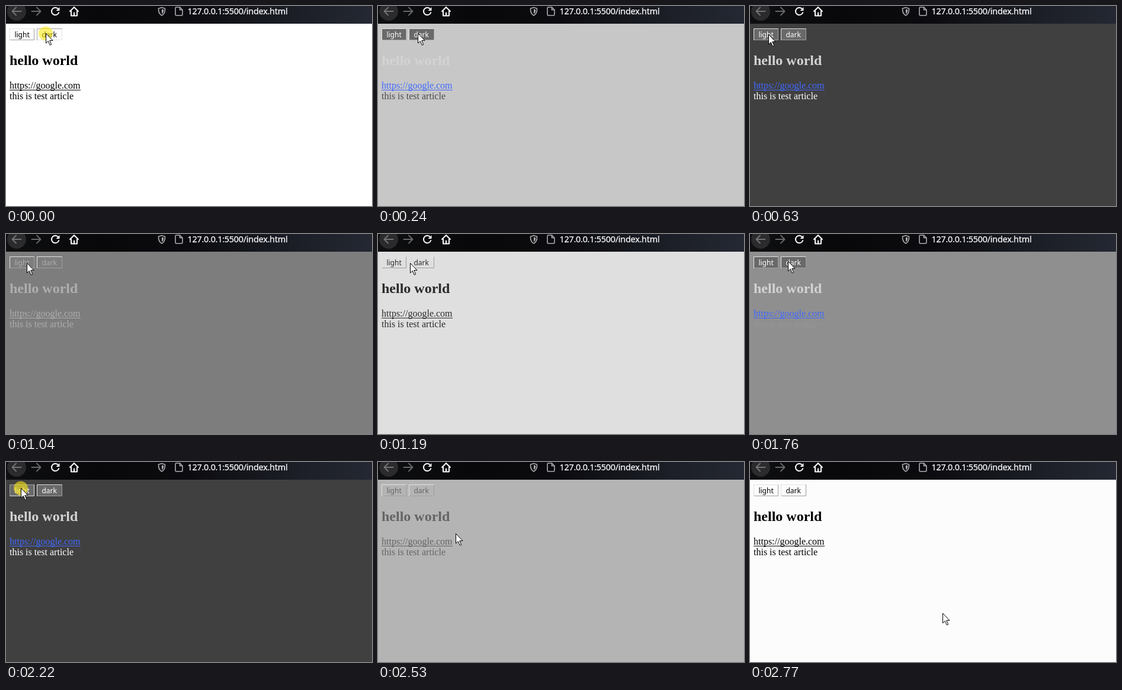
Animation of 618x339 px, one loop 2860 ms. Source, as an HTML page:

```html
<!DOCTYPE html>
<html lang="en">
<head>
<meta charset="utf-8">
<title>Theme switch</title>
<style>
  html, body { margin: 0; width: 100%; height: 100%; overflow: hidden; }
  svg { display: block; width: 618px; height: 339px; }
  .serif { font-family: "Liberation Serif", "Times New Roman", serif; font-size: 16px; }
  .title { font-size: 24px; font-weight: bold; }
  .label { font: 12px "Noto Sans", "Open Sans", sans-serif; }
  .url {
    font: 14.4px "Noto Sans", "Open Sans", sans-serif; letter-spacing: -.25px;
    fill: #fbfbfe; stroke: #fbfbfe; stroke-width: .25;
  }
  .icon { fill: none; stroke-width: 2; stroke-linecap: round; stroke-linejoin: round; }
  .thin { stroke-width: 1.6; stroke: #aeaeb2; }
  .edge { fill: none; stroke-width: 1; }
</style>
</head>
<body>
<svg viewBox="0 0 618 339" xmlns="http://www.w3.org/2000/svg">
  <defs>
    <linearGradient id="chrome">
      <stop offset="0" stop-color="#0e0f11"/>
      <stop offset=".25" stop-color="#08080a"/>
      <stop offset=".5" stop-color="#0c0c10"/>
      <stop offset=".8" stop-color="#1c1f27"/>
      <stop offset="1" stop-color="#242832"/>
    </linearGradient>
  </defs>

  <rect id="page" width="618" height="339"/>

  <g id="buttons"></g>
  <text id="title" class="serif title" x="6" y="100">hello world</text>
  <g id="link">
    <text class="serif" x="6" y="140">https://google.com</text>
    <rect x="6" y="142" width="120" height="1"/>
  </g>
  <text id="article" class="serif" x="6" y="158">this is test article</text>

  <rect width="618" height="30" fill="url(#chrome)"/>
  <circle cx="18" cy="9" r="16" fill="#2b2b2d"/>
  <path class="icon" stroke="#747476" d="M25.5 9H11M17 2.5L10.5 9L17 15.5"/>
  <path class="icon" stroke="#68686a" d="M43.5 9H58M52 2.500L58.500 9L52 15.500"/>
  <g stroke="#fbfbfe">
    <path class="icon" d="M88.500 5.500A6.300 6.300 0 1 0 89.200 11"/>
    <path d="M90.500 2V8H84.500Z" fill="#fbfbfe" stroke="none"/>
    <path class="icon" d="M108 9L115 2L122 9M110 8V16.500H120V8M115 16V11.500"/>
  </g>
  <path class="icon thin" d="M263 2.500L268.500 4.300C268.700 10 267 14 263 16C259 14 257.300 10 257.500 4.300Z"/>
  <path d="M263 5.200L266.200 6.200C266.100 9.700 265.200 12 263 13.300Z" fill="#aeaeb2"/>
  <path class="icon thin" d="M288 2H293.500L298 6.500V14.500Q298 16 296.500 16H287.500Q286 16 286 14.500V3.500Q286 2 287.500 2ZM293.500 2V6.500H298"/>
  <text class="url" x="306.500" y="14">127.0.0.1:5500/index.html</text>

  <circle id="halo" r="12" fill="#fce814" fill-opacity=".6"/>
  <path id="cursor" fill="#fff" stroke="#000"
        d="M.5 .5V17L4.300 13.400L7.200 20.300L9.700 19.300L6.800 12.500H12Z"/>
</svg>
<script>
const LOOP = 2860;
const FADE = 500;
const TICK = 80; // the screen refreshes at this pace after each click

// Each click: button held from press to release, theme fade, then the pointer's trip to the next spot
const CLICKS = [
  { press: -FADE, release: -FADE, fade: -FADE, dark: false, tip: [67, 46], leave: 0, arrive: 1 },
  { press: 0, release: 150, fade: 130, dark: true, tip: [67, 46], leave: 310, arrive: 630 },
  { press: 800, release: 950, fade: 925, dark: false, tip: [31, 48], leave: 950, arrive: 1330 },
  { press: 1520, release: 1600, fade: 1590, dark: true, tip: [64, 46], leave: 1760, arrive: 2000 },
  { press: 2220, release: 2370, fade: 2355, dark: false, tip: [25, 44], leave: 2370, arrive: 2770 },
  { press: LOOP, release: LOOP, tip: [325, 256] }
];

const $ = id => document.getElementById(id);
const fill = (el, color) => el.setAttribute('fill', color);
const move = (el, x, y) => el.setAttribute('transform', `translate(${x} ${y})`);
const gray = v => { const n = Math.round(v); return `rgb(${n},${n},${n})`; };
const clamp = v => Math.min(1, Math.max(0, v));
const mix = (a, b, p) => a + (b - a) * p;
const smooth = p => p * p * (3 - 2 * p);

function svg(tag, attrs, parent) {
  const el = document.createElementNS('http://www.w3.org/2000/svg', tag);
  for (const key in attrs) el.setAttribute(key, attrs[key]);
  return parent.appendChild(el);
}

function makeButton(text, x, width) {
  const g = svg('g', {}, $('buttons'));
  const l = x + .5, r = x + width - .5;
  const face = svg('rect', { x, y: 38, width, height: 20 }, g);
  const low = svg('path', { class: 'edge', d: `M${x} 57.5H${r}V38` }, g);
  const high = svg('path', { class: 'edge', d: `M${l} 58V38.5H${r}` }, g);
  const label = svg('text', { class: 'label', x: x + 8.4, y: 53 }, g);
  label.textContent = text;
  return { face, low, high, label };
}
const lightButton = makeButton('light', 6, 42);
const darkButton = makeButton('dark', 52, 43);

// CSS "ease": cubic-bezier(.25, .1, .25, 1)
function ease(x) {
  const curve = (s, a, b) => 3 * a * s * (1 - s) ** 2 + 3 * b * s * s * (1 - s) + s ** 3;
  let lo = 0, hi = 1;
  for (let i = 0; i < 24; i++) {
    const mid = (lo + hi) / 2;
    if (curve(mid, .25, .25) < x) lo = mid; else hi = mid;
  }
  return curve(lo, .1, 1);
}

function paintTheme(dark, shade) {
  const ink = gray(255 * shade);
  fill($('page'), gray(mix(255, 64, shade)));
  fill($('article'), ink);
  fill($('title'), dark ? '#d3d3d3' : ink);
  fill($('link'), dark ? '#4169ff' : ink);
  return ink;
}

function paintButton(button, dark, ink, down) {
  fill(button.face, dark ? '#696969' : 'none');
  fill(button.label, dark ? '#fff' : ink);
  button.high.setAttribute('stroke', down ? '#a0a0a0' : '#e3e3e3');
  button.low.setAttribute('stroke', down ? '#e3e3e3' : '#a0a0a0');
}

function paintPointer(from, to, t, pressed) {
  const p = smooth(clamp((t - from.leave) / (from.arrive - from.leave)));
  const x = mix(from.tip[0], to.tip[0], p);
  const y = mix(from.tip[1], to.tip[1], p) + 3 * Math.sin(Math.PI * p);
  $('halo').setAttribute('visibility', pressed ? 'visible' : 'hidden');
  move($('halo'), x, y + .5);
  move($('cursor'), Math.round(x), Math.round(y));
}

function draw(now) {
  const clock = now % LOOP;
  const i = CLICKS.findLastIndex(c => c.release <= clock);
  const last = CLICKS[i], next = CLICKS[i + 1];
  const t = last.release + TICK * Math.floor((clock - last.release) / TICK);
  const pressed = clock >= next.press;

  const p = ease(clamp((t - last.fade) / FADE));
  const ink = paintTheme(last.dark, last.dark ? p : 1 - p);
  paintButton(lightButton, last.dark, ink, pressed && !next.dark);
  paintButton(darkButton, last.dark, ink, pressed && next.dark);
  paintPointer(last, next, pressed ? clock : t, pressed);
}

let origin;
function tick(now) {
  origin ??= now;
  draw(now - origin);
  requestAnimationFrame(tick);
}
draw(0);
requestAnimationFrame(tick);
</script>
</body>
</html>
```
